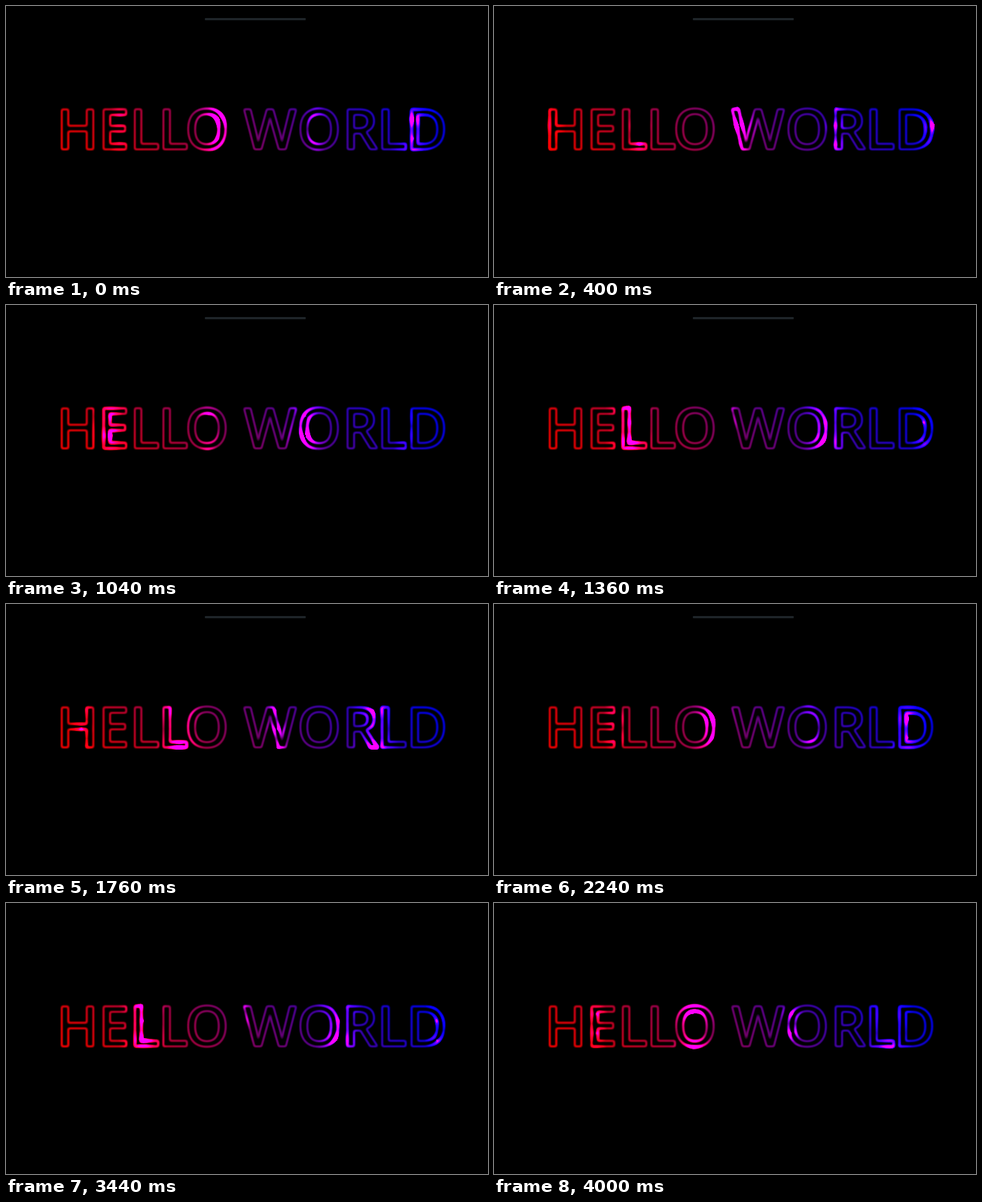
An HTML page that plays this animation: 640x361 px, repeating every 4080 ms.

```html
<!DOCTYPE html>
<html lang="en">
<head>
<meta charset="utf-8">
<title>Neon text</title>
<style>
  html, body { margin: 0; width: 100%; height: 100%; overflow: hidden; background: #000; }
  #bar {
    position: absolute; left: 264px; top: 16px; width: 134px; height: 3px;
    border-radius: 1px; background: #1e2428;
  }
  #neon {
    position: absolute; left: 67px; top: 109px; width: 520px; height: 102px;
    overflow: hidden; background: #000;
    filter: contrast(110%) brightness(190%);
  }
  #neon > * { position: absolute; inset: 0; }
  svg { width: 100%; height: 100%; filter: blur(1.5px); }
  text { font: 600 74.5px "Open Sans", "Noto Sans", sans-serif; fill: #fff; }
  /* A soft copy differenced with itself leaves only the glyph edges. */
  .edge { mix-blend-mode: difference; }
  .tint { background: linear-gradient(45deg, red, blue); mix-blend-mode: multiply; }
  #neon > #lights {
    inset: -100% 0 0 -100%;
    background:
      radial-gradient(circle, white, transparent 25%) 0 0 / 25% 25%,
      radial-gradient(circle, white, black 25%) 50% 50% / 12.5% 12.5%;
    mix-blend-mode: color-dodge;
  }
</style>
</head>
<body>
<div id="bar"></div>
<div id="neon">
  <svg><text id="word" y="82" x="0 55.5 97 135 170.5 228 248.5 319.5 379.5 425.5 464.5">HELLO WORLD</text></svg>
  <svg class="edge" aria-hidden="true"><use href="#word"/></svg>
  <div class="tint"></div>
  <div id="lights"></div>
</div>
<script>
  const LOOP = 4080, STEP = 80, WIDTH = 520, HEIGHT = 102;
  // [time in ms, horizontal travel of the lights in px]
  const TRAVEL = [[0, 84], [720, 160], [1360, 243], [2240, 353],
                  [2880, 445], [3440, 505], [4000, 588], [LOOP, 604]];
  const bar = document.getElementById('bar');
  const lights = document.getElementById('lights');

  function travelAt(t) {
    const i = TRAVEL.findIndex(([end]) => t < end);
    const [t0, x0] = TRAVEL[i - 1], [t1, x1] = TRAVEL[i];
    return x0 + (x1 - x0) * (t - t0) / (t1 - t0);
  }

  function draw(now) {
    const t = Math.floor(now % LOOP / STEP) * STEP;
    const x = travelAt(t) % WIDTH;
    lights.style.transform = `translate(${x}px, ${x * HEIGHT / WIDTH}px)`;
    bar.style.opacity = Math.min(1, Math.max(0, (3040 - t) / 240));
    requestAnimationFrame(draw);
  }

  draw(0);
</script>
</body>
</html>
```
